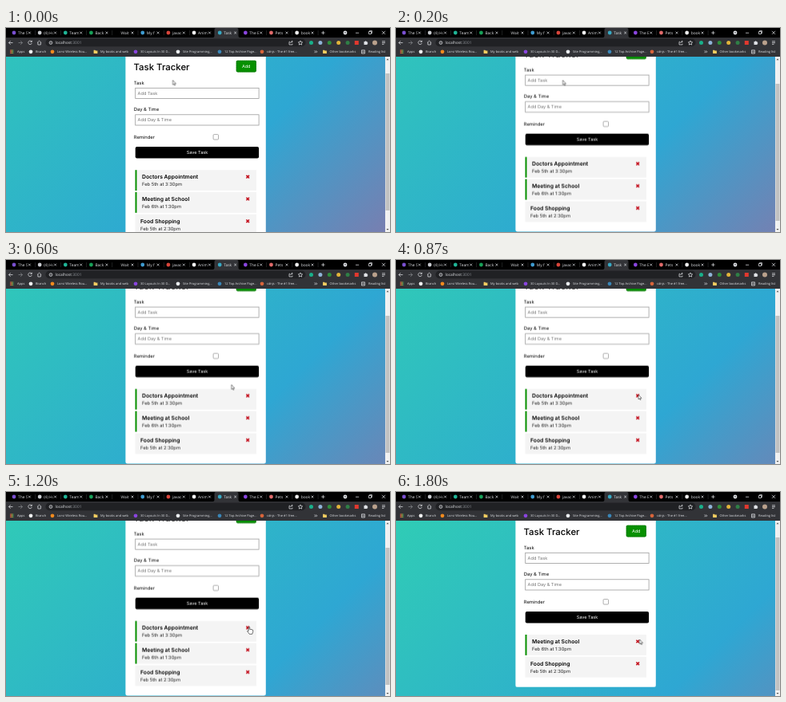
These frames come from a looping animation (480 px wide and 256 px high, 1.87 s). An HTML page:

```html
<!DOCTYPE html>
<html lang="en">
<head>
<meta charset="utf-8">
<title>Task Tracker</title>
<style>
  html, body { margin: 0; width: 100%; height: 100%; overflow: hidden; background: #000; }
  #stage { position: relative; width: 480px; height: 256px; overflow: hidden; }
  svg { position: absolute; left: 0; top: 0; }
  text { font-family: Inter, "Open Sans", sans-serif; fill: #000; text-rendering: geometricPrecision; }
  .ui text { font-family: "Open Sans", "Noto Sans", sans-serif; fill: #dfe1e5; }
  .ui .dim { fill: #8f9399; }
  .label { font-size: 5.8px; }
  .hint { font-size: 5.6px; fill: #757575; }
  .name { font-size: 6.8px; font-weight: 600; }
  .day { font-size: 5.8px; fill: #222; }
  .button { font-size: 5.5px; text-anchor: middle; fill: #fff; }
  .field { fill: #fff; stroke: #959595; stroke-width: .75; }

  /* 28 poses per loop; the small lead keeps each pose on its tick */
  #sky, .page, .lift, .gone, .thumb, .cursor, .arrow, .hand {
    animation: 1870ms step-end -7ms infinite;
  }

  #sky {
    position: absolute; left: 0; top: 36px; width: 474px; height: 220px;
    background: linear-gradient(-45deg, #ee7752, #e2457f, #2ea7d3, #30d4af) 0 0 / 1360px 680px;
    animation-name: sky;
  }
  @keyframes sky {
    0% { background-position: -265px 0; animation-timing-function: steps(9); }
    32.143% { background-position: -210px 0; animation-timing-function: steps(8); }
    60.714% { background-position: -165px 0; animation-timing-function: steps(11); }
    100% { background-position: -118px 0; }
  }

  .page { animation-name: scroll; }
  @keyframes scroll {
    0% { transform: translateY(16.4px); }
    3.571% { transform: translateY(8px); }
    7.143% { transform: translateY(1.5px); }
    10.714% { transform: translateY(0); }
    67.857%, 100% { transform: translateY(17.4px); }
  }

  .lift { animation-name: lift; }
  @keyframes lift {
    0% { transform: translateY(0); }
    67.857%, 100% { transform: translateY(-28px); }
  }
  .gone { animation-name: gone; }
  @keyframes gone {
    0% { opacity: 1; }
    67.857%, 100% { opacity: 0; }
  }

  .thumb { animation-name: thumb; }
  @keyframes thumb {
    0% { y: 57px; height: 172px; }
    3.571% { y: 64px; height: 172px; }
    7.143% { y: 69px; height: 172px; }
    10.714% { y: 70px; height: 172px; }
    67.857%, 100% { y: 57px; height: 192px; }
  }

  .cursor { animation-name: move; }
  @keyframes move {
    0% { transform: translate(208.5px, 65.5px); }
    14.286% { transform: translate(208.5px, 65.5px); animation-timing-function: steps(5); }
    32.143% { transform: translate(281.8px, 156.5px); animation-timing-function: steps(4); }
    46.429% { transform: translate(303px, 169px); }
    67.857% { transform: translate(303px, 169px); animation-timing-function: steps(2); }
    75% { transform: translate(305px, 188.5px); }
    92.857%, 100% { transform: translate(304.5px, 185px); }
  }
  .arrow { animation-name: arrow; }
  @keyframes arrow {
    0% { opacity: 1; }
    64.286% { opacity: 0; }
    92.857%, 100% { opacity: 1; }
  }
  .hand { animation-name: hand; }
  @keyframes hand {
    0% { opacity: 0; }
    64.286% { opacity: 1; }
    92.857%, 100% { opacity: 0; }
  }
</style>
</head>
<body>
<div id="stage">
  <div id="sky"></div>
  <svg width="480" height="256" viewBox="0 0 480 256">
    <defs>
      <path id="cross" d="M-1.8 -1.8L1.8 1.8M1.8 -1.8L-1.8 1.8" stroke="#c4101e" stroke-width="1.6"/>
      <path id="folder" d="M-2.4 -2h1.9l.7 .8h2.2v3.4h-4.8z" fill="#f2cc60"/>
    </defs>

    <g class="page">
      <rect class="lift" x="149.4" y="-60" width="175.4" height="315.5" rx="2.5" fill="#fff"/>
      <text x="159.5" y="36.2" font-size="11.4" font-weight="500">Task Tracker</text>
      <rect x="287.7" y="24" width="25.2" height="15" rx="2" fill="#079000"/>
      <rect x="288.2" y="24.5" width="24.2" height="14" rx="1.6" fill="none" stroke="#064d06" stroke-width=".5" stroke-dasharray="1 .7"/>
      <text class="button" x="300.2" y="33.6">Add</text>

      <text class="label" x="159.8" y="54.5">Task</text>
      <rect class="field" x="161.7" y="58.9" width="154.4" height="13.2"/>
      <text class="hint" x="164.6" y="67.6">Add Task</text>
      <text class="label" x="159.8" y="88">Day &amp; Time</text>
      <rect class="field" x="161.7" y="92.4" width="154.4" height="13.2"/>
      <text class="hint" x="164.6" y="101.1">Add Day &amp; Time</text>
      <text class="label" x="159.8" y="122.4">Reminder</text>
      <rect class="field" x="259.1" y="117.2" width="6.4" height="6.4" rx="1"/>
      <rect x="161.7" y="132.7" width="154.4" height="14.5" rx="2"/>
      <text class="button" x="239" y="142">Save Task</text>

      <g class="gone" id="first"></g>
      <g class="lift" id="rest"></g>
    </g>

    <g>
      <rect x="474" y="36" width="6" height="220" fill="#f1f1f1"/>
      <rect class="thumb" x="474.5" y="57" width="5" height="172" fill="#c1c1c1"/>
      <path d="M475.5 40.3l1.5-1.7 1.5 1.7zM475.5 252l1.5 1.7 1.5-1.7z" fill="#505050"/>
    </g>

    <g class="ui">
      <rect width="480" height="12" fill="#000"/>
      <path d="M258.5 12q2 0 2-2v-8q0-2 2-2h26q2 0 2 2v8q0 2 2 2z" fill="#323337"/>
      <rect y="12" width="480" height="24" fill="#323337"/>
      <rect x="49.5" y="13.5" width="325" height="9.8" rx="4.9" fill="#202124"/>
      <g id="chrome"></g>
      <g fill="none" stroke="#dfe1e5" stroke-width=".75">
        <path d="M394.2 6h4.4M396.4 3.8v4.4"/>
        <path d="M437 6.2h4.2M453.5 4.5h3v3h-3zM454.5 4.5v-1h3v3h-1M470 3.8l4 4M474 3.8l-4 4"/>
        <path d="M8.5 18.5h-5M5.7 16.2l-2.3 2.3 2.3 2.3"/>
        <path d="M15.5 18.5h5M18.2 16.2l2.3 2.3-2.3 2.3" stroke="#85878b"/>
        <path d="M32 17a2.3 2.3 0 1 0 .3 2M32.3 15.7v1.8h-1.8"/>
        <path d="M39 18.5l2.6-2.4 2.6 2.4M39.9 18v3h3.4v-3"/>
        <circle cx="56" cy="18.5" r="1.9"/><path d="M56 18.2v1.2M56 17.2v.5"/>
        <path d="M355.2 17.3h-1.2v3.6h4v-1.2M355.5 19q.3-2 2.5-2M357 15.8l1.3 1.2-1.3 1.2"/>
        <path d="M368 15.9l.8 1.8 1.9 .2-1.4 1.3 .4 1.9-1.7-1-1.7 1 .4-1.9-1.4-1.3 1.9-.2z"/>
        <path d="M470 16.8h4M470 18.6h4M470 20.4h2.5"/>
        <path d="M385.6 28.4l1.3 1.4-1.3 1.4M387.5 28.4l1.3 1.4-1.3 1.4"/>
        <path d="M444.5 27.8h4v4.2h-4zM445.6 29.2h1.8M445.6 30.6h1.8"/>
      </g>
      <circle cx="424" cy="6" r="2.4" fill="#dfe1e5"/>
      <path d="M422.9 5.5h2.2l-1.1 1.3z"/>
      <path d="M447.5 17h1.3a.8 .8 0 0 1 1.6 0h1.2v1.3a.8 .8 0 0 1 0 1.6v1.1h-4.1z" fill="#dfe1e5"/>
    </g>

    <g class="cursor">
      <path class="arrow" d="M0 0v5.8l1.3-1.2 .9 2 .9-.4-.9-1.9h1.8z" fill="#fff" stroke="#111" stroke-width=".5"/>
      <path class="hand" d="M.2 .6q.8-.9 1.5 0v2.7q2.6-.1 4 1v2.4l-1 2.6h-3.4l-2.7-3.6q.1-1.1 1.6-.2z" fill="#fff" stroke="#111" stroke-width=".6"/>
    </g>
  </svg>
</div>
<script>
  const NS = "http://www.w3.org/2000/svg";
  const $ = id => document.getElementById(id);

  function add(parent, tag, attrs, content) {
    const el = document.createElementNS(NS, tag);
    for (const key in attrs) el.setAttribute(key, attrs[key]);
    if (content) el.textContent = content;
    return parent.appendChild(el);
  }

  function task(parent, y, name, day, reminder) {
    const x = reminder ? 170 : 168;
    add(parent, "rect", { x: 161.5, y, width: 151.5, height: 25.9, fill: "#f4f4f4" });
    if (reminder) add(parent, "rect", { x: 161.5, y, width: 2, height: 25.9, fill: "#079000" });
    add(parent, "text", { class: "name", x, y: y + 11 }, name);
    add(parent, "text", { class: "day", x, y: y + 20.2 }, day);
    add(parent, "use", { href: "#cross", x: 302.2, y: y + 8.5 });
  }
  task($("first"), 161.8, "Doctors Appointment", "Feb 5th at 3:30pm", true);
  task($("rest"), 189.6, "Meeting at School", "Feb 6th at 1:30pm", true);
  task($("rest"), 217.4, "Food Shopping", "Feb 5th at 2:30pm", false);

  const bar = $("chrome");
  const dot = (cx, cy, r, fill) => add(bar, "circle", { cx, cy, r, fill });
  const write = (x, y, size, str) => add(bar, "text", { x, y, "font-size": size }, str);

  const tabs = [
    ["The S", "#7a4fd0"], ["(4) How", "#c9ccd1"], ["Team", "#1fb597"], ["Back", "#18a058"],
    ["Wait", ""], ["My f", "#3f9bd0"], ["javac", "#d8453a"], ["Anim", "#f4f4f4"],
    ["Task", "#38a9c4"], ["The E", "#8a45e0"], ["Pets", "#e06a6a"], ["book", "#f0f0f0"]
  ];
  tabs.forEach(([title, color], i) => {
    const x = 10 + i * 32.15;
    const active = title === "Task";
    if (color) dot(x, 6, 2.4, color);
    write(x + 5, 7.8, 4.9, title);
    // cut the title short of the close button
    add(bar, "rect", { x: x + 16.6, y: 2, width: 6, height: 8, fill: active ? "#323337" : "#000" });
    add(bar, "path", {
      d: `M${x + 18} 4.6l2.8 2.8m0-2.8l-2.8 2.8`, stroke: "#dfe1e5", "stroke-width": .7
    });
    if (!active) add(bar, "rect", { x: x + 26.2, y: 3, width: .4, height: 6, fill: "#4a4c50" });
  });

  add(write(61.5, 20.3, 4.9, "localhost"), "tspan", { class: "dim" }, ":3001");

  ["#19b08a", "#8fb4d8", "#2f8f3c", "#e2b43a", "#2f7f46"].forEach((c, i) => dot(381.5 + i * 11.4, 18.5, 2.5, c));
  add(bar, "rect", { x: 435.8, y: 16, width: 5, height: 5, fill: "#e2382e" });
  dot(461, 18.5, 3, "#b9a08c");

  for (let i = 0; i < 9; i++) {
    add(bar, "rect", {
      x: 5 + i % 3 * 1.7, y: 27.4 + Math.floor(i / 3) * 1.7, width: 1.2, height: 1.2,
      fill: ["#e8584a", "#f0c040", "#4fa860"][i % 3]
    });
  }
  const marks = [
    [14, "Apps"], [37, "Branch", "#f0f0f0"], [64, "Lorvi Wireless Rou...", "#f28a1e"],
    [118, "My books and web", "folder"], [168, "30 Layouts In 30 D...", "#8a45e0"],
    [221, "Site Programming...", "#eceff2"], [273, "12 Top Archive Page...", "#3a86b8"],
    [326, "cdnjs - The #1 free...", "#d9653b"], [404.5, "Other bookmarks", "folder"], [453, "Reading list"]
  ];
  marks.forEach(([x, label, icon]) => {
    if (icon === "folder") add(bar, "use", { href: "#folder", x: x - 6, y: 29.8 });
    else if (icon) dot(x - 6, 29.8, 2.4, icon);
    write(x, 31.3, 4, label);
  });
</script>
</body>
</html>
```
